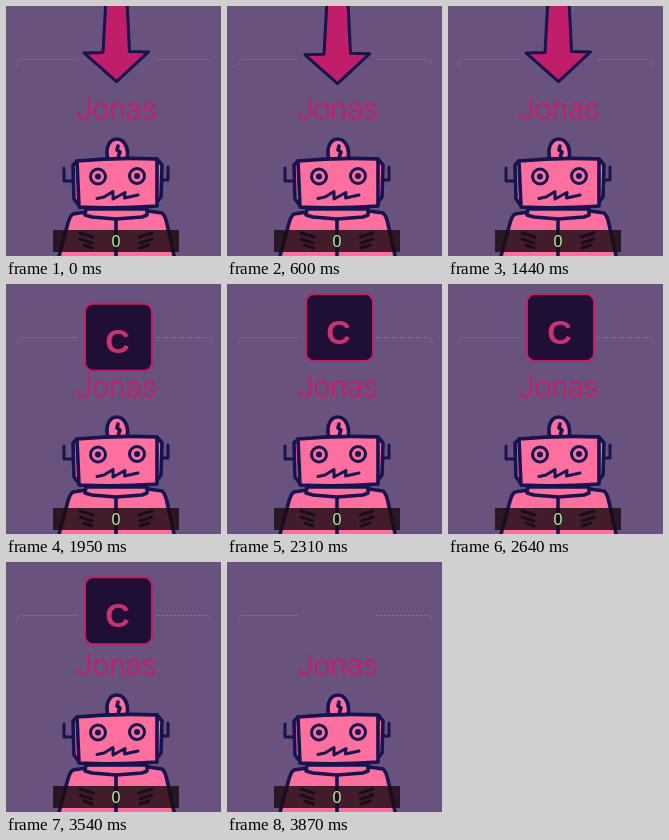
These frames come from a looping animation (215x250 px, 4.44 s). An HTML page:

```html
<!DOCTYPE html>
<html lang="en">
<head>
<meta charset="utf-8">
<title>Robot with bouncing arrow</title>
<style>
  html, body { margin: 0; width: 100%; height: 100%; overflow: hidden; background: #6a527f; }
  svg { display: block; width: 215px; height: 250px; }
  .ink { stroke: #16134f; stroke-linecap: round; stroke-linejoin: round; }
  .line { fill: none; }
  .pink { fill: #ff709e; }
  .name { font: 300 30px Roboto, "Liberation Sans", sans-serif; fill: #c41f69; stroke: #c41f69; stroke-width: .5; }
  .letter { font: 700 34px "Liberation Sans", Inter, sans-serif; fill: #c93270; }
  .count { font: 16px "Liberation Sans", Inter, sans-serif; fill: #a9efa4; }
</style>
</head>
<body>
<svg viewBox="0 0 215 250" text-anchor="middle">
  <!-- panel outline -->
  <path d="M11 59Q11 53.5 16 53.5H72M149 53.5H200Q205 53.5 205 59"
        fill="none" stroke="#b5a3bd" stroke-opacity=".45" stroke-dasharray="1 1"/>

  <text class="name" x="110.5" y="112.5">Jonas</text>

  <g class="ink" stroke-width="3.6">
    <!-- body and neck plate -->
    <path class="pink" d="M80 206 67 208Q64 210 62 217L52 254H169L161 218Q159 209 156 207L142 205Z"/>
    <path class="line" d="M110 213V254"/>
    <path class="pink" d="M80 203 79 209 86 211 110 213 136 211 141 209V203Z"/>
    <path class="line" stroke-width="3" d="M74 227 87 231M74 233 86 237M78 239 86 242M133 231 146 227M134 237 146 233M134 242 143 239"/>
    <!-- dome -->
    <path class="pink" d="M102 154C95 126 126 126 121 154Z"/>
    <path class="line" d="M112 140 111 144 114 146 112.500 150"/>
    <!-- ears and head -->
    <path class="line" stroke-width="3" d="M58 162V175H66M162 161V174H155"/>
    <path class="pink" d="M71 155 67 159 68 193 74 201 148 200 155 191 156 159 151 153Z"/>
    <path class="pink" d="M71 155Q111 151 151 153L151 200Q111 203 73 201Z"/>
    <!-- face -->
    <g class="line" stroke-width="3">
      <circle cx="92" cy="170.500" r="7.500"/>
      <circle cx="131" cy="170" r="7.500"/>
      <path d="M91 192.500 98 191 107 185.500V193L119 186.500 118.500 192 132 189"/>
    </g>
    <g fill="#16134f" stroke="none">
      <circle cx="92" cy="170.500" r="3"/>
      <circle cx="131" cy="170" r="3"/>
    </g>
  </g>

  <rect x="47" y="224" width="126" height="22" fill="#1c0b13" fill-opacity=".83"/>
  <text class="count" x="110" y="241">0</text>

  <path id="arrow" class="ink" fill="#c01e68" stroke-width="3"
        d="M101-30 97 42.500 78 43 110.500 71.800 142.500 42 123.500 41.500 120-30Z"/>
  <g id="card">
    <rect x="79" y="14" width="67" height="67" rx="8" fill="#1f0f35" stroke="#c41f66" stroke-width="2"/>
    <text class="letter" x="111.500" y="63.500">C</text>
  </g>
</svg>
<script>
  const LOOP = 4440, STEP = 30, PERIOD = 480, LOWEST = 75, REACH = 7;
  const SWAP = 1770, END = 3870;
  const arrow = document.getElementById("arrow");
  const card = document.getElementById("card");

  function place(el, shown, dy) {
    el.setAttribute("visibility", shown ? "visible" : "hidden");
    el.setAttribute("transform", `translate(0 ${dy.toFixed(2)})`);
  }

  function draw(now) {
    const t = Math.floor((now % LOOP) / STEP) * STEP;
    const dy = REACH * Math.cos(2 * Math.PI * (t - LOWEST) / PERIOD);
    place(arrow, t < SWAP, dy);
    place(card, t >= SWAP && t < END, dy);
  }

  const start = performance.now();
  function tick() {
    draw(performance.now() - start);
    requestAnimationFrame(tick);
  }
  tick();
</script>
</body>
</html>
```
